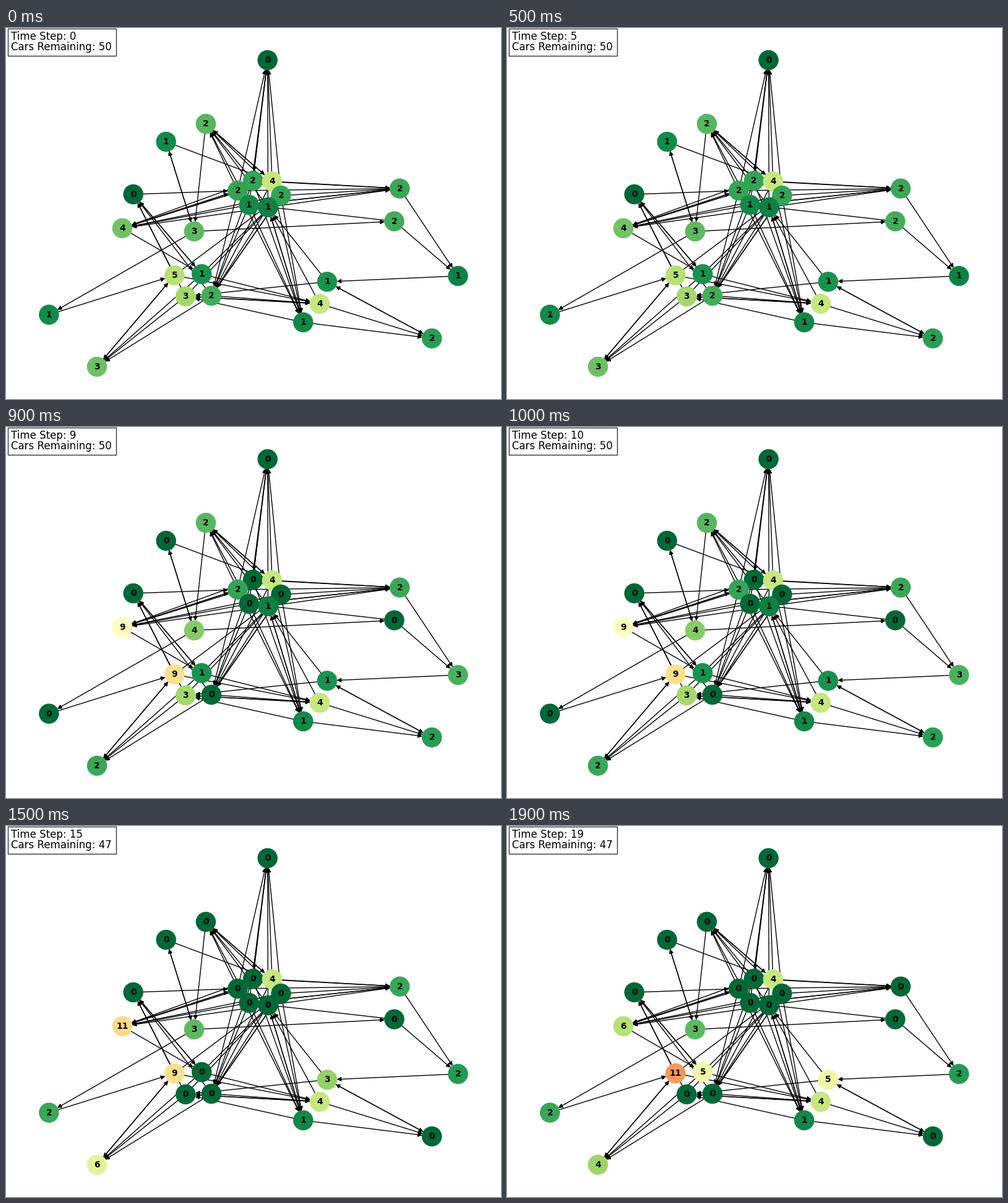
A matplotlib script that plays this animation: 800x600 px, repeating every 2 s.

```python
from itertools import product

import matplotlib.pyplot as plt
from matplotlib.animation import FuncAnimation
from matplotlib.patches import FancyArrowPatch, Rectangle

STEPS, STEP_MS = 20, 100
NODE_SIZE = 500

# road: x, y, capacity, cars at the start
ROADS = {
    "A": (422.7, 52, 12, 0), "B": (323, 155, 11, 2), "C": (258.7, 184, 14, 1),
    "D": (205.7, 269, 12, 0), "F": (399, 247, 15, 2), "E": (374.5, 263, 15, 2),
    "G": (430, 248, 11, 4), "H": (444.5, 271, 15, 2), "I": (392.8, 286, 14, 1),
    "J": (423.5, 290, 19, 1), "K": (636.3, 259.6, 14, 2),
    "L": (627.5, 312.6, 13, 2), "M": (188, 323.8, 18, 4),
    "N": (304, 329, 16, 3), "O": (272.3, 400, 15, 5), "P": (316.3, 398, 11, 1),
    "Q": (290.3, 434, 10, 3), "R": (332, 433, 13, 2), "S": (519, 410.4, 11, 1),
    "T": (507, 446, 11, 4), "U": (480.3, 476, 15, 1), "V": (730.5, 401, 18, 1),
    "W": (69.4, 463.6, 14, 1), "X": (147, 547.8, 14, 3), "Y": (688.3, 502, 17, 2),
}

# every road entering a junction leads to every road leaving it
JUNCTIONS = [
    ("EFGHIJ", "ABMKRU"), ("OPQR", "DHTX"), ("DM", "EP"), ("XW", "O"),
    ("BC", "GN"), ("N", "CWL"), ("KL", "VI"), ("STU", "JQY"),
    ("VY", "S"), ("A", "F"),
]

# step: moves as road, next road, cars ("-" means the cars have arrived)
MOVES = {
    6: "IM1", 7: "RX2", 8: "LV2 FM2 CN1", 9: "HM2 WO1 XO3",
    11: "VS1 EM2 QX3 J-1", 12: "NW2 N-1 YS1 Y-1",
    14: "BN2 PX1", 16: "XO2", 18: "KV2", 19: "VS2 MP5",
}


def cars_at(step):
    cars = {name: road[3] for name, road in ROADS.items()}
    for when, moves in MOVES.items():
        if when > step:
            continue
        for start, end, n in moves.split():
            cars[start] -= int(n)
            if end in cars:
                cars[end] += int(n)
    return cars


def node_colors(cars):
    return [plt.cm.RdYlGn_r(n / ROADS[name][2]) for name, n in cars.items()]


fig = plt.figure(figsize=(8, 6), dpi=100, facecolor="white")
ax = fig.add_axes((0, 0, 1, 1))
ax.set_xlim(0, 800)
ax.set_ylim(600, 0)
ax.axis("off")

margin = NODE_SIZE ** 0.5 / 2
for ins, outs in JUNCTIONS:
    for a, b in product(ins, outs):
        ax.add_patch(FancyArrowPatch(
            ROADS[a][:2], ROADS[b][:2], arrowstyle="-|>", mutation_scale=10,
            shrinkA=margin, shrinkB=margin, color="black", lw=1, zorder=1))

xs, ys = zip(*(road[:2] for road in ROADS.values()))
nodes = ax.scatter(xs, ys, s=NODE_SIZE, c=node_colors(cars_at(0)), zorder=2)
labels = {
    name: ax.text(road[0], road[1], "", size=10, weight="bold",
                  family="DejaVu Sans", ha="center", va="center", zorder=3)
    for name, road in ROADS.items()
}

ax.add_patch(Rectangle((2.5, 0.5), 175, 44, fc="white", ec="black",
                       lw=1, alpha=0.8, zorder=4))
clock, remaining = (
    ax.text(8, y, "", size=12, family="DejaVu Sans", va="baseline", zorder=5)
    for y in (18.7, 35.7)
)


def draw(step):
    cars = cars_at(step)
    nodes.set_facecolor(node_colors(cars))
    nodes.set_edgecolor(node_colors(cars))
    for name, n in cars.items():
        labels[name].set_text(str(n))
    clock.set_text(f"Time Step: {step}")
    remaining.set_text(f"Cars Remaining: {sum(cars.values())}")
    return [nodes, clock, remaining, *labels.values()]


anim = FuncAnimation(fig, draw, frames=STEPS, interval=STEP_MS,
                     init_func=lambda: draw(0), repeat=True)
plt.show()
```
